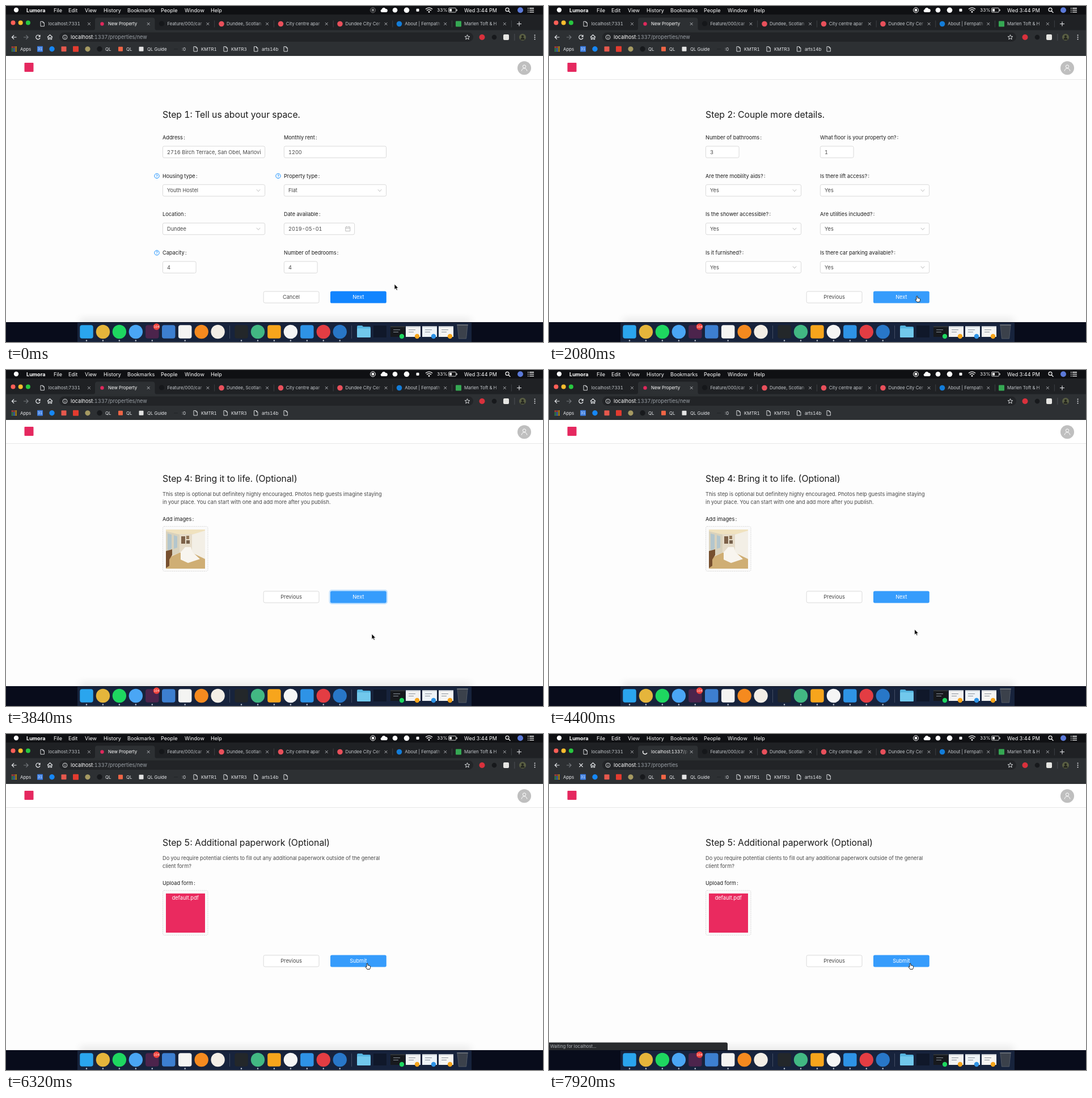
These frames come from a looping animation (947 by 592 pixels, 8000 ms). An HTML page:

```html
<!DOCTYPE html>
<html lang="en">
<head>
<meta charset="utf-8">
<title>New Property</title>
<style>
html, body { margin: 0; height: 100%; overflow: hidden; background: #fdfdfd }
svg { display: block; width: 100vw; height: 100vh; font-family: Inter, "Open Sans", sans-serif; font-variant-numeric: tabular-nums }
text { white-space: pre }
</style>
</head>
<body>
<svg id="stage" viewBox="0 0 947 592"></svg>
<script>
const LOOP = 8000, TICK = 80;
const INK = '#1c1c1c', SOFT = '#484848', LINE = '#d6d6d6', LIGHT = '#e8eaed', DIM = '#9aa0a6';
const STRIP = '#1f2124', BAR = '#2d3033';

// Drawing helpers; text is placed by its vertical centre
const rect = (x, y, w, h, fill, more = '') => `<rect x="${x}" y="${y}" width="${w}" height="${h}" fill="${fill}" ${more}/>`;
const dot = (x, y, r, fill, more = '') => `<circle cx="${x}" cy="${y}" r="${r}" fill="${fill}" ${more}/>`;
const line = (d, stroke, w = 1, more = '') => `<path d="${d}" fill="none" stroke="${stroke}" stroke-width="${w}" ${more}/>`;
const text = (x, y, s, size, fill, more = '') => `<text x="${x}" y="${y + size * .36}" font-size="${size}" fill="${fill}" ${more}>${s}</text>`;
const group = (id, body, more = '') => `<g id="${id}" ${more}>${body}</g>`;
const square = (x, y, size, fill, r = 1) => rect(x - size / 2, y - size / 2, size, size, fill, `rx="${r}"`);
const cross = (x, y, r, stroke, w) => line(`M${x - r} ${y - r}l${2 * r} ${2 * r}m0 ${-2 * r}l${-2 * r} ${2 * r}`, stroke, w);
const page = (x, y) => line(`M${x - 3} ${y - 4.2}h4l2.4 2.4v6h-6.4zm4 0v2.4h2.4`, LIGHT, .9);

function menuBar() {
  const items = [[84, 'File'], [110, 'Edit'], [139, 'View'], [172, 'History'], [214, 'Bookmarks'], [273, 'People'], [315, 'Window'], [361, 'Help']];
  return rect(0, 0, 947, 15, '#0f1013') + dot(18, 7, 4.2, '#fff')
    + text(36, 7.3, 'Lumora', 9.1, '#fff', 'font-weight="700"')
    + items.map(([x, s]) => text(x, 7.3, s, 9.1, '#fff')).join('')
    + group('rec', dot(647, 7.3, 4.5, 'none', 'stroke="#fff"') + square(647, 7.3, 4.4, '#fff', 1))
    + `<path d="M662.5 11a2.6 2.6 0 0 1 0-5a3.8 3.8 0 0 1 7-1a3 3 0 0 1 .6 6z" fill="#fff"/>`
    + dot(686, 7.3, 4.3, '#fff') + dot(706.5, 7.3, 4.8, '#fff') + square(726, 7.3, 5, '#fff')
    + line('M740 5.6q6-5 12 0M742 8q4-3.4 8 0', '#fff', 1.3) + dot(746, 10.4, 1.3, '#fff')
    + text(760, 7.3, '33%', 8.1, '#fff')
    + rect(780.5, 3.5, 13, 7.5, 'none', 'stroke="#fff" stroke-width=".8" rx="1.4"') + rect(782, 5, 4, 4.5, '#fff') + rect(794.5, 5.8, 1.2, 3, '#fff')
    + text(808, 7.3, 'Wed 3:44 PM', 9, '#fff')
    + dot(884, 6.4, 3, 'none', 'stroke="#fff" stroke-width="1.1"') + line('M886.2 8.7l3.2 3.2', '#fff', 1.3)
    + dot(907, 7.3, 5, '#5b79d8')
    + line('M920 4h1.5m1.5 0h8M920 7.3h1.5m1.5 0h8M920 10.6h1.5m1.5 0h8', '#fff', 1.3);
}

function tabs() {
  const list = [
    ['localhost:7331', page(64, 31.5)],
    ['', ''],
    ['Feature/000/car', dot(274.5, 31, 4.6, '#15171a')],
    ['Dundee, Scotlan', dot(380, 31.5, 4.8, '#e8505b')],
    ['City centre apar', dot(484.5, 31.5, 4.8, '#e8505b')],
    ['Dundee City Cer', dot(589, 31.5, 4.8, '#e8505b')],
    ['About | Fernpath', dot(693.5, 31.5, 4.8, '#137cd8')],
    ['Marlen Toft &amp; H', square(798, 31.5, 10, '#35a853')]
  ];
  const fade = (x, id) => rect(x + 54, 24, 13, 15, `url(#${id})`);
  let s = rect(0, 15, 947, 28, STRIP);
  s += ['#ff5f57', '#febc2e', '#28c840'].map((c, i) => dot(12.5 + 13.2 * i, 29.5, 4, c)).join('');
  s += `<path d="M153 43q4 0 4-4V25q0-4.5 4.5-4.5H258q4.5 0 4.5 4.5v14q0 4 4 4z" fill="${BAR}"/>`;
  list.forEach(([title, icon], i) => {
    const x = 75 + 104.7 * i;
    if (i !== 1) s += icon + text(x - (i ? 0 : .5), 31.5, title, 7.9, '#c4c8cc') + (i ? fade(x, 'fadeStrip') : '');
    s += cross(x + 71.5, 31.5, 2.3, '#c4c7cb', .9);
    if (i > 1) s += rect(x + 83, 25.5, .7, 12, '#4a4d51');
  });
  s += text(180, 31.5, '', 7.9, '#fff', 'id="title"') + fade(179, 'fadeBar');
  s += dot(169.5, 31.5, 3.2, '#e0285c', 'id="icon"')
    + dot(0, 0, 3.9, 'none', 'id="spin" stroke="#fff" stroke-width="1.5" pathLength="100"');
  return s + line('M901 31.5h8m-4-4v8', LIGHT, 1.1);
}

function toolbar() {
  return rect(0, 42.5, 947, 45.5, BAR) + rect(94, 46.5, 730, 16.5, '#222427', 'rx="8.2"')
    + line('M18.5 55h-8m3.6-3.7L10.4 55l3.7 3.7', LIGHT, 1.2)
    + line('M31 55h8m-3.6-3.7L39.1 55l-3.7 3.7', '#74787d', 1.2)
    + group('reload', line('M59.6 53a3.7 3.7 0 1 0 .4 3', LIGHT, 1.2) + `<path d="M60.6 50.5v4h-4z" fill="${LIGHT}"/>`)
    + group('stop', cross(56.5, 55, 3.1, LIGHT, 1.3))
    + line('M73 55l4.5-4.2L82 55m-7.6-.8v4.5h2v-3h2.2v3h2v-4.5', LIGHT, 1.1)
    + dot(104, 55, 3.9, 'none', `stroke="${LIGHT}" stroke-width=".9"`) + line('M104 52.6v1m0 1v2.7', LIGHT)
    + `<text x="114" y="58.2" font-size="9.2" fill="${DIM}"><tspan fill="#fff">localhost</tspan>:1337/properties<tspan id="tail">/new</tspan></text>`
    + line('M813.5 50.7l1.2 2.9 3.1.2-2.4 2 .8 3-2.7-1.7-2.7 1.7.8-3-2.4-2 3.1-.2z', LIGHT, .9)
    + dot(839.5, 55, 5, '#d9313c') + dot(861, 55, 4.3, '#17191c') + square(882, 55, 10, '#e6e6e3', 2)
    + rect(896.5, 49, .8, 12, '#55585c') + dot(911, 55, 6, '#5a5f43') + dot(911, 53.6, 2.1, '#24261f')
    + `<path d="M907.4 59.6q0-4 3.6-4t3.6 4z" fill="#24261f"/>`
    + [51.4, 55, 58.6].map(y => dot(932.5, y, 1, LIGHT)).join('');
}

function bookmarks() {
  const y = 75.8, colors = ['#e8453c', '#e8453c', '#f4b400', '#34a853', '#4285f4', '#f4b400', '#34a853', '#4285f4', '#f4b400'];
  const names = [[25, 'Apps'], [175, 'QL'], [212, 'QL'], [249, 'QL Guide'], [310, ':0'], [344, 'KMTR1'], [397, 'KMTR3'], [451, 'arts14b']];
  return colors.map((c, i) => square(11 + i % 3 * 3.3, y - 3.3 + (i / 3 | 0) * 3.3, 2.2, c, 0)).join('')
    + square(60, y, 10, '#3c7de0') + text(60, y, '31', 6, '#fff', 'text-anchor="middle"')
    + dot(81, y, 4.7, '#1687f5') + square(102, y, 9, '#e5584d') + square(123, y, 10, '#e33b2f')
    + dot(144, y, 4.6, '#a69a62') + dot(165, y, 4.7, '#17191c') + square(202, y, 8, '#ef6545') + square(238.5, y, 8, '#e3e3e3')
    + rect(296, 75.4, 7, 1, '#202226')
    + [334, 387, 440.5, 493].map(x => page(x, y)).join('')
    + names.map(([x, s]) => text(x, y, s, 7.9, LIGHT)).join('');
}

function dock() {
  const icons = [
    ['s', '#2aa5ee'], ['c', '#e5b53b'], ['c', '#1ed760'], ['c', '#4aa6f5'], ['s', '#4c244c'], ['s', '#3d7fd0'], ['s', '#f4f4f2'], ['c', '#f58a1f'], ['c', '#f3eee6'],
    ['s', '#23272a'], ['c', '#42b883'], ['s', '#f7a51c'], ['c', '#f5f5f5'], ['s', '#2e93e6'], ['c', '#e33d43'], ['c', '#2877c8']
  ];
  let s = rect(130, 551, 690, 12, '#000', 'opacity=".09" filter="url(#blur)"')
    + rect(0, 557, 947, 35, '#080c1b') + rect(126, 558, 695, 34, '#17233c');
  icons.forEach(([kind, color], i) => {
    const x = 142 + 28.95 * i + (i > 8 ? 12.5 : 0);
    s += kind === 'c' ? dot(x, 574, 12.2, color) : square(x, 574, 23.5, color, 4);
    if (![5, 7, 8].includes(i)) s += dot(x, 589.5, 1.2, '#c9d0da');
  });
  s += dot(265.5, 565, 5.8, '#f0423c') + text(265.5, 565, '104', 5.2, '#fff', 'text-anchor="middle"');
  s += rect(394, 563, .8, 23, '#4b566b') + rect(609, 563, .8, 23, '#4b566b');
  s += `<path d="M619 565q0-2 2-2h7l2 2h11q2 0 2 2v15q0 2-2 2h-20q-2 0-2-2z" fill="#55b4df"/>` + rect(619, 568, 24, 16, '#71c8ec', 'rx="1.5"');
  s += rect(648, 563, 23, 21, '#10182a');
  [[678, '#17191d', '#1ed760'], [705, '#f2f2f2', '#f7a51c'], [734, '#eef3f7', '#2e93e6'], [763, '#f5f5f3', '#f7a51c']].forEach(([x, back, mark], i) => {
    s += rect(x, 564, 26, 19, back) + rect(x, 564, 26, 2, i ? '#c9ced4' : '#303337')
      + rect(x + 5, 570, 12, 1, '#8a929c') + rect(x + 5, 574, 9, 1, '#8a929c') + dot(x + 20, 582, 4.2, mark);
  });
  return s + `<path d="M796 562h18l-2.4 24h-13.2z" fill="#3b414b" stroke="#5b626d" stroke-width=".8"/>` + rect(795, 561, 20, 2, '#626973', 'rx="1"');
}

// Form parts
const label = (x, y, s) => text(x, y, `${s}<tspan dx="1.3">:</tspan>`, 9.2, INK);
const title = s => text(276, 191.6, s, 15.8, INK);
const lines = (x, y, rows) => rows.map((s, i) => text(x, y + 13.8 * i, s, 9.2, SOFT)).join('');
const box = (x, y, w, h) => rect(x + .4, y, w - .8, h, '#fff', `rx="2.6" stroke="${LINE}" stroke-width=".9"`);
const field = (x, row, w, name, value, kind) => {
  const y = 257.2 + 67.7 * row, end = x + w - 12;
  let s = label(x, y - 25.7, name) + box(x, y - 10.2, w, 20.4)
    + text(x + 8, y, value, 9.2, SOFT, kind === 'long' ? 'clip-path="url(#cut)"' : '');
  if (kind === 'pick') s += line(`M${end - 3.2} ${y - 1.7}l3.2 3.6l3.2-3.6`, '#b4b4b4', .9);
  if (kind === 'date') s += line(`M${end - 4.2} ${y - 3}h8v7h-8zm0 2.3h8m-6-4v2m4-2v2`, '#b4b4b4', .9);
  return s;
};
const help = (x, row) => {
  const y = 299.4 + 67.7 * row;
  return dot(x, y, 4.2, 'none', 'stroke="#1890ff"') + text(x, y, '?', 6.8, '#1890ff', 'text-anchor="middle" font-weight="600"');
};
const upload = s => rect(276.5, 275.5, 79.5, 79, '#fafafa', `rx="2.6" stroke="${LINE}" stroke-width=".9" stroke-dasharray="2 1.3"`) + s;

function photo() {
  return rect(282, 281, 69, 69, '#e6dcc9') + rect(282, 281, 69, 8, '#f0e2bf')
    + `<path d="M282 284l24 6v32l-24 8z" fill="#d9d2bd"/><path d="M285 288l7 2v25l-7 3zM296 291l6 2v20l-6 2z" fill="#b3c6cd"/>`
    + `<path d="M328 290l23-7v51l-23-10z" fill="#f3efe6"/><path d="M282 350v-17l24-11h22l23 11v17z" fill="#cfae74"/>`
    + rect(309, 293, 7, 13, '#7d6249') + rect(318, 292, 5, 6, '#94795a') + rect(318, 300, 6, 6, '#76614c')
    + `<path d="M308 321l8-9h10l3 9 13 12-21 7-13-6z" fill="#f8f5ef"/><path d="M282 319l11-3v10l-5 8v11l-6 4z" fill="#77502f"/>`;
}

const rent = 490, wide = 181;
const steps = [
  { at: 0, y: 502.5, lit: 700, body: title('Step 1: Tell us about your space.')
    + field(276, 0, wide, 'Address', '2716 Birch Terrace, San Obel, Marlovia', 'long') + field(rent, 0, wide, 'Monthly rent', '1200')
    + help(266, 0) + field(276, 1, wide, 'Housing type', 'Youth Hostel', 'pick') + help(480, 0) + field(rent, 1, wide, 'Property type', 'Flat', 'pick')
    + field(276, 2, wide, 'Location', 'Dundee', 'pick') + field(rent, 2, 125, 'Date available', '2019-05-01', 'date')
    + help(266, 2) + field(276, 3, 59.5, 'Capacity', '4') + field(rent, 3, 59.5, 'Number of bedrooms', '4') },
  { at: 1120, y: 502.5, lit: 0, body: title('Step 2: Couple more details.')
    + field(276, 0, 59.5, 'Number of bathrooms', '3') + field(478, 0, 59.5, 'What floor is your property on?', '1')
    + [['Are there mobility aids?', 'Is there lift access?'], ['Is the shower accessible?', 'Are utilities included?'], ['Is it furnished?', 'Is there car parking available?']]
      .map(([a, b], i) => field(276, i + 1, 169, a, 'Yes', 'pick') + field(478, i + 1, 193, b, 'Yes', 'pick')).join('') },
  { at: 2320, y: 451.2, lit: 3380, body: title('Step 3: Set the scene.')
    + lines(276, 219, ["Write a quick summary of your place. You can highlight what's special about your space", 'and the neighborhood.'])
    + label(276, 262.5, 'Summary') + box(276, 275.4, 395, 144)
    + lines(284, 285.8, ['The apartment is ideally located in the heart of the city centre and within easy walking', 'distance of the main bus and train station.', '',
      'There are several excellent restaurants and essential local amenities less than 5', 'minutes walk from the apartment.', '',
      'The apartment offers fantastic views to the North onto some of Dundee’s most famous', 'landmarks with superb sunsets as the light dims behind The Law.'])
    + line('M664.5 418l5-5m-2 5l2-2', '#777', .8) },
  { at: 3760, y: 389.4, lit: 0, body: title('Step 4: Bring it to life. (Optional)')
    + lines(276, 219, ['This step is optional but definitely highly encouraged. Photos help guests imagine staying', 'in your place. You can start with one and add more after you publish.'])
    + label(276, 262.5, 'Add images') + upload(photo()) },
  { at: 4960, y: 389.4, lit: 0, body: title('Step 5: Additional paperwork (Optional)')
    + lines(276, 219, ['Do you require potential clients to fill out any additional paperwork outside of the general', 'client form?'])
    + label(276, 262.5, 'Upload form')
    + upload(rect(282, 281, 69, 69, '#ea2a5f') + text(316.3, 288.3, 'default.pdf', 9.2, '#fff', 'text-anchor="middle"')) }
];
const SUBMIT = 5360, LOAD = 6880, COMMIT = 7440;

const fadeDef = (id, c) => `<linearGradient id="${id}"><stop stop-color="${c}" stop-opacity="0"/><stop offset="1" stop-color="${c}"/></linearGradient>`;
document.getElementById('stage').innerHTML =
  `<defs>${fadeDef('fadeStrip', STRIP)}${fadeDef('fadeBar', BAR)}<clipPath id="cut">${rect(284, 247, 166, 21, '#000')}</clipPath>`
  + `<filter id="blur" x="-10%" y="-300%" width="120%" height="700%"><feGaussianBlur stdDeviation="7"/></filter></defs>`
  + rect(0, 88, 947, 470, '#fdfdfd') + rect(0, 88, 947, 41, '#fff') + rect(0, 129, 947, .9, '#e6e6e6')
  + square(40.5, 108, 16, '#e5285f')
  + dot(914, 109.3, 12, '#bfbfbf') + dot(914, 106.6, 2.7, 'none', 'stroke="#fff"') + line('M909.2 114.6a4.8 4.8 0 0 1 9.6 0', '#fff')
  + menuBar() + tabs() + toolbar() + bookmarks() + dock()
  + steps.map((s, i) => group('step' + i, s.body)).join('')
  + group('buttons', rect(572, 0, 98.8, 21, 'none', 'id="wave" stroke="#1890ff"')
    + rect(454.2, .4, 97.8, 20.2, '#fff', `rx="2.6" stroke="${LINE}" stroke-width=".9"`) + rect(572, 0, 98.8, 21, '', 'id="go" rx="2.6"')
    + text(503, 10.5, '', 9.2, SOFT, 'id="back" text-anchor="middle"') + text(621.3, 10.5, '', 9.2, '#fff', 'id="next" text-anchor="middle"'))
  + group('status', `<path d="M0 543.6h312q3 0 3 3V557H0z" fill="#292b2e"/>` + text(2, 550.6, 'Waiting for localhost...', 7.8, '#aeb2b7'))
  + `<path id="arrow" d="M0 0V9.5L2.2 7.5L3.8 11L5.4 10.3L3.9 7H6.8Z" fill="#000" stroke="#fff" stroke-width=".7"/>`
  + `<path id="hand" d="M-1 .6Q0-.6 1 .6V3.6Q5 4 5.6 5.2V7.5L4.5 10.5H-.2L-3 6.6Q-2.8 5.4-1.6 6L-1 6.6Z" fill="#fff" stroke="#111" stroke-width=".9"/>`;

const el = {};
document.querySelectorAll('[id]').forEach(e => el[e.id] = e);
const set = (id, attrs) => { for (const k in attrs) el[id].setAttribute(k, attrs[k]); };
const show = (id, on) => set(id, { visibility: on ? 'visible' : 'hidden' });
const clamp = v => Math.max(0, Math.min(1, v));
const mix = (a, b, p) => a + (b - a) * p;

// Pointer stops: time, x, y
const track = [[0, 685, 490], [320, 685, 490], [880, 649, 511], [2800, 649, 511], [3300, 645, 465],
  [3900, 645, 465], [4200, 644.7, 457], [4400, 644.7, 457], [4760, 637, 404], [LOOP, 637, 404]];
function pointer(t) {
  const i = track.findIndex(k => k[0] > t), [t0, x0, y0] = track[i - 1], [t1, x1, y1] = track[i];
  const p = (t - t0) / (t1 - t0), e = p * p * (3 - 2 * p);
  return [mix(x0, x1, e), mix(y0, y1, e)];
}

function draw(now) {
  const t = Math.floor(now % LOOP / TICK) * TICK;
  const n = steps.filter(s => t >= s.at).length - 1, step = steps[n];
  steps.forEach((s, i) => show('step' + i, i === n));
  set('buttons', { transform: `translate(0 ${step.y})` });
  el.back.textContent = n ? 'Previous' : 'Cancel';
  el.next.textContent = n === 4 ? 'Submit' : 'Next';

  const lit = step.lit ? clamp((t - step.lit) / 300) : 1;
  set('go', { fill: `rgb(${mix(17, 54, lit)},${mix(132, 156, lit)},${mix(254, 252, lit)})` });
  const since = t - (t >= SUBMIT ? SUBMIT : step.at);
  const spread = 4 * Math.sqrt(1 - (1 - clamp(since / 400)) ** 2);
  set('wave', { 'stroke-width': 2 * spread, opacity: n ? .28 * (1 - clamp(since / 600)) : 0, rx: 2.6 });

  const [x, y] = pointer(t);
  const over = x > 572 && x < 671 && y > step.y && y < step.y + 21;
  for (const id of ['arrow', 'hand']) {
    set(id, { transform: `translate(${x} ${y})` });
    show(id, (id === 'hand') === over);
  }

  const loading = t >= LOAD, moved = t >= COMMIT;
  set('rec', { opacity: t < 400 ? .45 : 1 });
  for (const id of ['status', 'stop', 'spin']) show(id, loading);
  for (const id of ['reload', 'icon']) show(id, !loading);
  el.title.textContent = moved ? 'localhost:1337/p' : 'New Property';
  el.tail.textContent = moved ? '' : '/new';
  const spin = Math.max(0, t - LOAD - TICK);
  set('spin', {
    'stroke-dasharray': `${Math.min(50, 4 + spin / 12)} 100`,
    transform: `translate(169.5 31.5) rotate(${-90 - spin / 4})`
  });
}

const start = performance.now();
(function tick() {
  draw(performance.now() - start);
  requestAnimationFrame(tick);
})();
</script>
</body>
</html>
```
